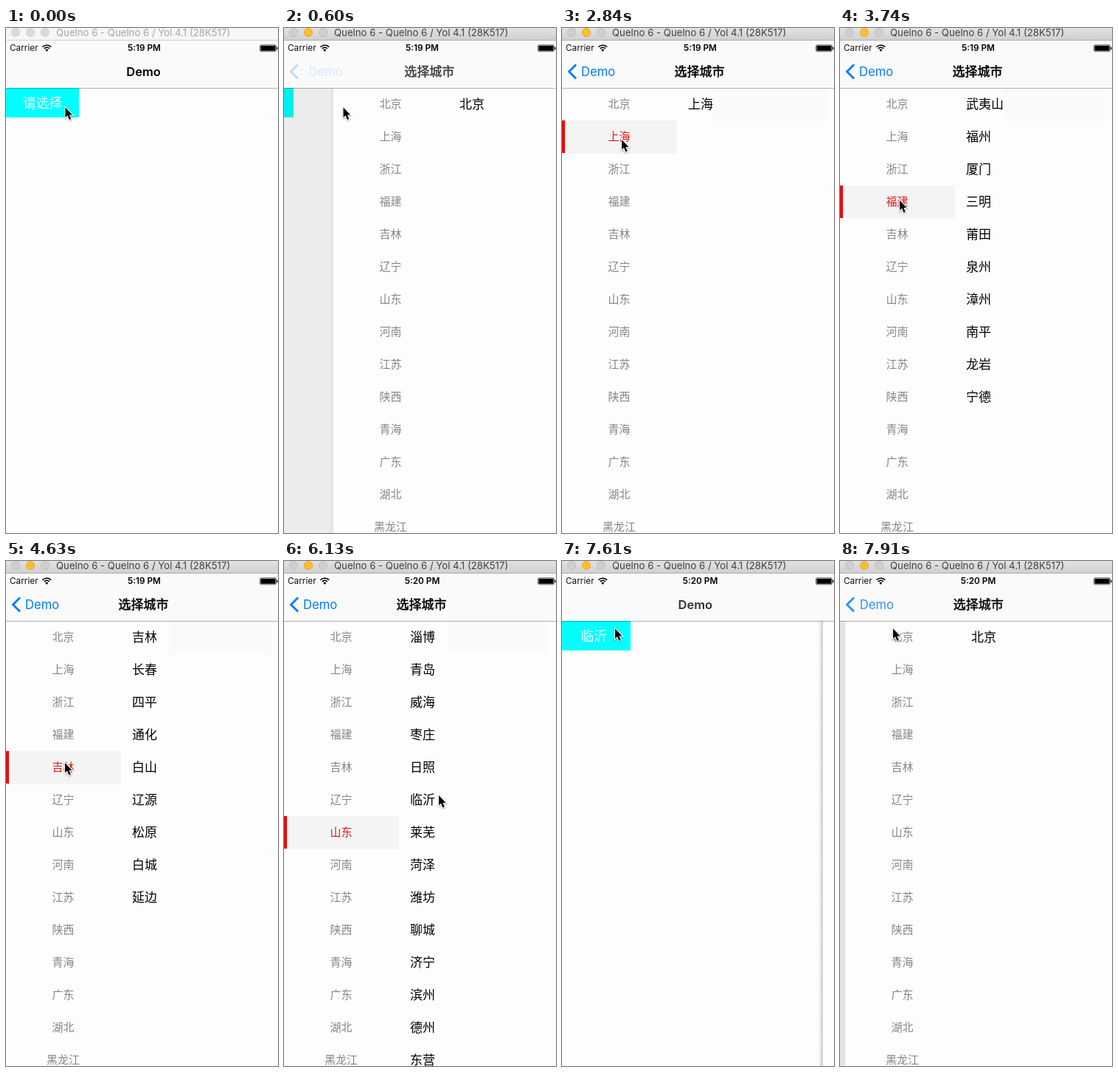
Animation, 369 px wide and 683 px high, one loop 8 s. Source, as an HTML page with a canvas:

```html
<!DOCTYPE html>
<html lang="zh">
<head>
<meta charset="utf-8">
<title>Demo</title>
<style>
  html, body { margin: 0; width: 100%; height: 100%; overflow: hidden; background: #fdfdfd; }
  canvas { display: block; width: 369px; height: 683px; }
</style>
</head>
<body>
<canvas id="stage"></canvas>
<script>
const W = 369, H = 683, PHONE = 375, TOP = 81, ROW = 44, SPLIT = 156;
const LOOP = 8000, TICK = 149.2; // the picture advances in ticks
const LATIN = 'Inter, Roboto, sans-serif';
const CJK = '"Noto Sans CJK SC", "Noto Sans CJK", sans-serif';
const PAGE = '#fdfdfd';

// Ticks of the main events.
const OPEN = 3, CLOSE = 43, RESET = 50, REOPEN = 51, NEXT_MINUTE = 36;
const taps = [10, 19, 22, 25, 31, 33, 36]; // one per province, top down

// Pointer moves: first tick, last tick, destination.
const moves = [
  [0, 0, 80.5, 107.5], [14, 16, 81, 151], [20, 24, 81, 233], [26, 27, 84, 364],
  [28, 29, 80, 273], [32, 35, 81, 356], [38, 41, 210, 317], [47, 50, 72, 91.5]
];

const provinces = '北京 上海 浙江 福建 吉林 辽宁 山东 河南 江苏 陕西 青海 广东 湖北 黑龙江'.split(' ');
const cities = [
  '北京',
  '上海',
  '杭州 宁波 温州 嘉兴 湖州 绍兴 金华 衢州 舟山 台州 丽水 义乌 余姚 海宁',
  '武夷山 福州 厦门 三明 莆田 泉州 漳州 南平 龙岩 宁德',
  '吉林 长春 四平 通化 白山 辽源 松原 白城 延边',
  '沈阳 大连 鞍山 抚顺 本溪 丹东 锦州 营口 阜新 辽阳 盘锦 铁岭 朝阳 兴城',
  '淄博 青岛 威海 枣庄 日照 临沂 莱芜 菏泽 潍坊 聊城 济宁 滨州 德州 东营'
].map(s => s.split(' '));

const canvas = document.getElementById('stage');
const ctx = canvas.getContext('2d');
const dpr = window.devicePixelRatio || 1;
canvas.width = W * dpr;
canvas.height = H * dpr;

// Critically damped spring, n ticks after its start.
function spring(n) {
  if (n < 0) return 0;
  const s = .38 + 2.76 * n;
  const p = 1 - (1 + s) * Math.exp(-s);
  return p > .995 ? 1 : p;
}

function pushedAt(k) {
  if (k >= REOPEN) return spring(k - REOPEN);
  return k < CLOSE ? spring(k - OPEN) : 1 - spring(k - CLOSE);
}

function chosenAt(k) {
  return k >= RESET ? -1 : taps.filter(tap => tap <= k).length - 1;
}

function pointerAt(k) {
  let x = 0, y = 0;
  for (const [first, last, toX, toY] of moves) {
    if (k < first) break;
    const f = Math.min(1, (k - first + 1) / (last - first + 1));
    x += (toX - x) * f;
    y += (toY - y) * f;
  }
  return [x, y];
}

function rect(x, y, w, h, color) {
  ctx.fillStyle = color;
  ctx.fillRect(x, y, w, h);
}

function text(str, x, y, font, color, align = 'left', alpha = 1) {
  ctx.globalAlpha = alpha;
  ctx.font = font;
  ctx.fillStyle = color;
  ctx.textAlign = align;
  ctx.fillText(str, x, y);
  ctx.globalAlpha = 1;
}

// Vertically centred Chinese text.
function han(str, x, mid, size, color, align, weight = 400) {
  text(str, x, Math.round(mid + size * .36), `${weight} ${size}px ${CJK}`, color, align);
}

function windowBar(active) {
  const fill = ctx.createLinearGradient(0, 0, 0, 16);
  fill.addColorStop(0, active ? '#e2e2e2' : '#f6f6f6');
  fill.addColorStop(1, active ? '#d0d0d0' : '#f6f6f6');
  rect(0, 0, W, 16, fill);
  rect(0, 16, W, 1, active ? '#aeaeae' : '#cfcfcf');
  for (let i = 0; i < 3; i++) {
    const lit = active && i === 1;
    ctx.beginPath();
    ctx.arc(13 + 20 * i, 6, 5.6, 0, 7);
    ctx.fillStyle = lit ? '#fdbd2f' : active ? '#cfcfcf' : '#dadada';
    ctx.strokeStyle = lit ? '#e0a32c' : active ? '#b9b9b9' : '#d0d0d0';
    ctx.lineWidth = .8;
    ctx.fill();
    ctx.stroke();
  }
  text('Quelno 6 - Quelno 6 / Yol 4.1 (28K517)', 68, 11, `13.2px ${LATIN}`, active ? '#404040' : '#a6a6a6');
}

function statusBar(clock) {
  text('Carrier', 5, 31.3, `11.8px ${LATIN}`, '#111');
  text(clock, 187.5, 31.3, `600 11.8px ${LATIN}`, '#000', 'center');

  ctx.strokeStyle = '#000';
  ctx.lineWidth = 1.6;
  for (const r of [4.8, 8]) {
    ctx.beginPath();
    ctx.arc(55.3, 31.2, r, -Math.PI * .76, -Math.PI * .24);
    ctx.stroke();
  }
  ctx.fillStyle = '#000';
  ctx.beginPath();
  ctx.moveTo(55.3, 32);
  ctx.arc(55.3, 31.2, 2.6, -Math.PI * .78, -Math.PI * .22);
  ctx.fill();

  ctx.lineWidth = .6;
  ctx.beginPath();
  ctx.roundRect(344.5, 22.8, 22, 9, 1.8);
  ctx.stroke();
  rect(345.5, 23.8, 20, 7, '#000');
  rect(367.3, 25.8, 1.3, 3.2, '#000');
}

function navBar(p) {
  rect(0, 17, W, TOP - 17, '#fafafa');
  rect(0, TOP, W, 1, 'rgba(0,0,0,.3)');

  text('Demo', 186.5 - p * 100, 65, `600 16.5px ${LATIN}`, '#000', 'center', Math.max(0, 1 - 3.5 * p));
  if (!p) return;

  const backAlpha = p ** 10;
  text('Demo', 26 + (1 - p) * 41, 65, `16.6px ${LATIN}`, '#007aff', 'left', backAlpha);
  ctx.globalAlpha = Math.max(backAlpha, p * .3);
  ctx.strokeStyle = '#007aff';
  ctx.lineWidth = 2.8;
  ctx.beginPath();
  ctx.moveTo(19, 49.5);
  ctx.lineTo(9.5, 59);
  ctx.lineTo(19, 68.5);
  ctx.stroke();

  // A thin outline gives the regular face a medium weight.
  const x = 186.5 + (1 - p) * 60;
  ctx.globalAlpha = 1;
  han('选择城市', x, 59, 17, `rgba(0,0,0,${p * p})`, 'center');
  ctx.strokeStyle = `rgba(0,0,0,${p * p})`;
  ctx.lineWidth = .5;
  ctx.strokeText('选择城市', x, 65);
}

function homePage(label, p) {
  const x = Math.round(-p * PHONE * .28);
  rect(0, TOP, W, H - TOP, PAGE);
  rect(x, TOP, 99, 40, '#00ffff');
  han(label, x + 49.5, 101.5, 17.7, '#fff', 'center', 300);
  rect(0, TOP, W, H - TOP, `rgba(0,0,0,${.1 * p * p})`);
}

function cityPage(sel, p) {
  const x = Math.round((1 - p) * PHONE);
  const settled = p === 1;
  if (!settled) {
    const edge = ctx.createLinearGradient(x - 6, 0, x, 0);
    edge.addColorStop(0, 'rgba(0,0,0,0)');
    edge.addColorStop(1, `rgba(0,0,0,${.22 * (1 - p)})`);
    rect(x - 6, TOP, 6, H - TOP, edge);
  }
  ctx.save();
  ctx.translate(x, 0);
  rect(0, TOP, W, H - TOP, PAGE);
  if (settled) {
    const band = sel < 1 ? SPLIT : sel < 3 ? 205 : 222;
    rect(band, TOP, 359 - band, 45, '#fafafa');
  }
  const lit = settled ? Math.max(0, sel) : sel;
  if (lit >= 0) rect(0, TOP + lit * ROW, SPLIT, ROW + 1, '#f4f4f4');
  if (sel >= 0) rect(0, TOP + sel * ROW, 4, ROW, '#e60c0c');
  provinces.forEach((name, i) =>
    han(name, 77.5, 103 + i * ROW, 15, i === sel ? '#e01818' : '#858585', 'center'));
  cities[Math.max(0, sel)].forEach((name, i) =>
    han(name, 171, 102.5 + i * ROW, 17, '#000', 'left'));
  ctx.restore();
}

function arrow([x, y]) {
  ctx.save();
  ctx.translate(x, y);
  ctx.beginPath();
  [[0, 0], [0, 13.6], [3, 10.8], [5.4, 16.4], [7.8, 15.4], [5.4, 10], [9.6, 10]]
    .forEach(([px, py]) => ctx.lineTo(px, py));
  ctx.closePath();
  ctx.shadowColor = 'rgba(0,0,0,.35)';
  ctx.shadowBlur = 2 * dpr;
  ctx.shadowOffsetY = dpr;
  ctx.strokeStyle = '#fff';
  ctx.lineWidth = 2;
  ctx.stroke();
  ctx.shadowColor = 'transparent';
  ctx.fillStyle = '#000';
  ctx.fill();
  ctx.restore();
}

function draw(t) {
  const k = Math.floor(t / TICK), p = pushedAt(k);
  ctx.setTransform(dpr, 0, 0, dpr, 0, 0);
  if (p < 1) homePage(k < CLOSE ? '请选择' : '临沂', p);
  if (p > 0) cityPage(chosenAt(k), p);
  navBar(p);
  statusBar(k < NEXT_MINUTE ? '5:19 PM' : '5:20 PM');
  windowBar(k > 0);
  arrow(pointerAt(k));
}

const start = performance.now();
function tick() {
  draw((performance.now() - start) % LOOP);
  requestAnimationFrame(tick);
}
tick();
</script>
</body>
</html>
```
